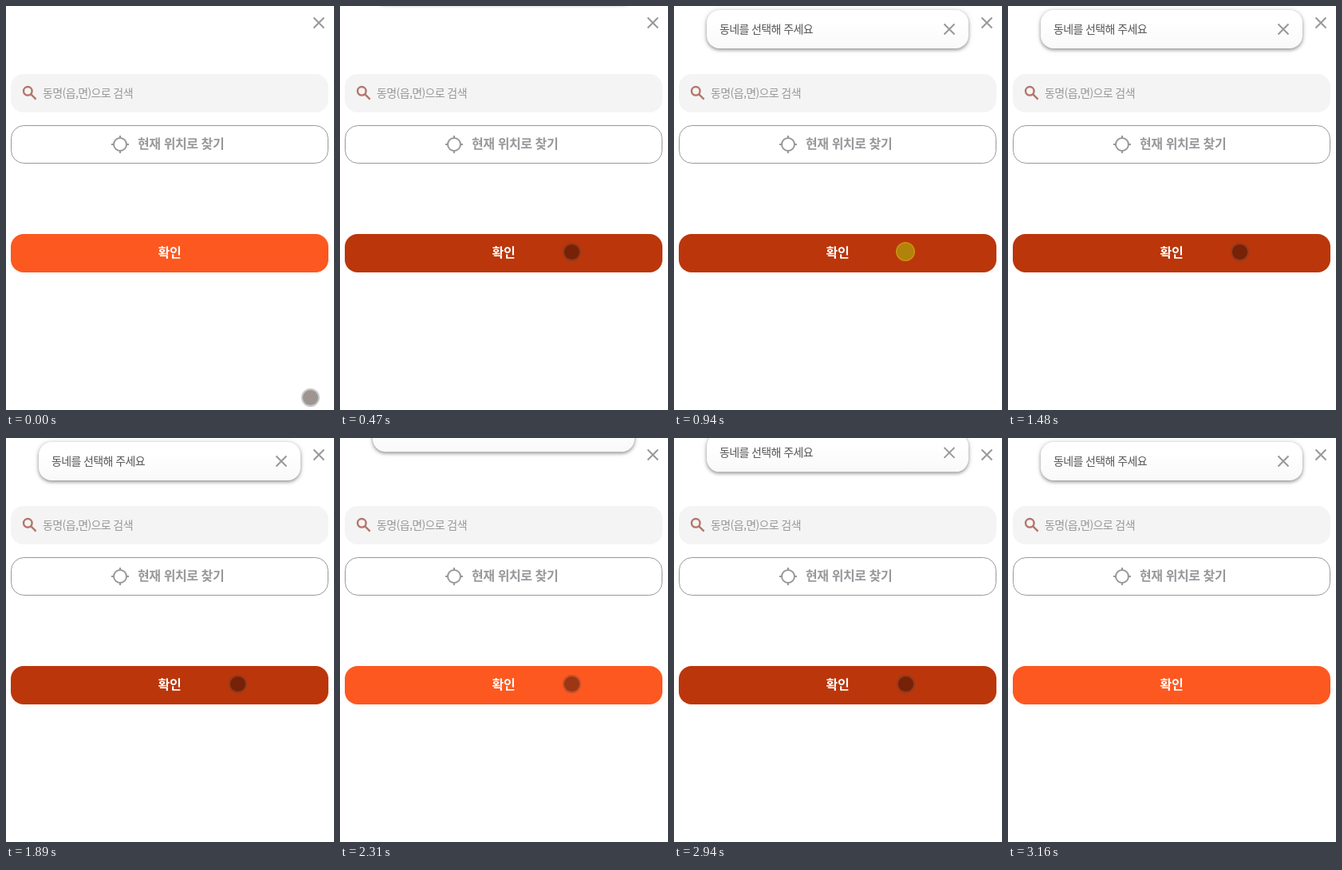
Write an HTML page that moves like this. It is 411 by 505 pixels and loops after 3820 ms.

```html
<!DOCTYPE html>
<html lang="ko">
<head>
<meta charset="utf-8">
<style>
  html, body { margin: 0; width: 100%; height: 100%; overflow: hidden; background: #fff; }
  svg { display: block; width: 100%; height: 100%; }
  text { font: 14px "Noto Sans CJK KR", "Noto Sans CJK", "Noto Sans CJK JP", sans-serif; letter-spacing: -.62px; }
  .label { font-size: 16px; font-weight: 700; letter-spacing: -.42px; }
  .line { fill: none; stroke: #98989c; stroke-width: 2; }
  #toast rect { filter: drop-shadow(0 2px 2px rgba(0,0,0,.36)) drop-shadow(0 0 3px rgba(0,0,0,.14)); }
</style>
</head>
<body>
<svg viewBox="0 0 411 505">
  <defs>
    <linearGradient id="sheen" x2="0" y2="1">
      <stop offset=".3" stop-color="#fff"/>
      <stop offset="1" stop-color="#f9f9f9"/>
    </linearGradient>
    <path id="cross" class="line" d="M-6.5-6.5 6.5 6.5M6.5-6.5-6.5 6.5"/>
  </defs>

  <use href="#cross" x="392" y="21"/>

  <rect x="6" y="85" width="398" height="48" rx="16" fill="#f4f4f4"/>
  <g fill="none" stroke="#b5766a" stroke-width="2.4">
    <circle cx="27.3" cy="106.3" r="5.3"/>
    <path d="M31.3 110.3 37.6 116.6"/>
  </g>
  <text x="46" y="114" fill="#98989c">동명(읍,면)으로 검색</text>

  <rect x="6.5" y="149.5" width="397" height="47" rx="16" fill="#fff" stroke="#98989c"/>
  <g class="line" transform="translate(143 173)">
    <circle r="8"/>
    <path d="M0-11V-7M0 11V7M-11 0H-7M11 0H7"/>
  </g>
  <text class="label" x="165" y="178" fill="#98989c">현재 위치로 찾기</text>

  <rect id="button" x="6" y="285" width="398" height="48" rx="16"/>
  <text class="label" x="190.6" y="314" fill="#fff">확인</text>

  <g id="toast">
    <rect x="41" y="5" width="328" height="48" rx="16" fill="url(#sheen)"/>
    <text x="57" y="34" fill="#555558">동네를 선택해 주세요</text>
    <use href="#cross" x="345" y="29"/>
  </g>

  <g id="pointer">
    <circle id="dot" r="10"/>
    <circle id="ring" r="10.6" fill="none" stroke-width="2"/>
  </g>
</svg>
<script>
const LOOP = 3820, HIDDEN = -58;
const [button, toast, pointer, dot, ring] =
  ["button", "toast", "pointer", "dot", "ring"].map(id => document.getElementById(id));

// [from ms, x, y]; the pointer leaves the stage at the end
const path = [[0, 381.5, 489.5], [70, 352, 426], [130, 308, 338], [200, 290.5, 307.5],
  [3000, 314, 352], [3070, 345, 411]];
const GONE = 3145;

const clamp = v => Math.min(1, Math.max(0, v));
const easeOut = p => 1 - (1 - p) ** 1.8;
const easeIn = p => p ** 1.7;

// Screen updates come in ticks, and the button is tapped on every second one
function tickAt(t) {
  const [from, step] = t < 1190 ? [395, 67.5] : [1190, 69.4];
  const n = Math.floor((t - from) / step);
  return { n, time: from + n * step };
}

function toastY(t) {
  const enter = from => HIDDEN * (1 - easeOut(clamp((t - from) / 480)));
  if (t < 455) return HIDDEN;
  if (t < 1935) return enter(455);
  if (t < 2632) return HIDDEN * easeIn(clamp((t - 1935) / 485));
  return enter(2632);
}

function isPressed(t, n) {
  if (t < 395 || t >= 2855) return false;
  if (t < 935) return n % 2 === 0;
  return t < 1190 || n % 2 === 1;
}

function draw(t) {
  const { n, time } = tickAt(t);
  const y = toastY(time);
  toast.setAttribute("transform", `translate(0 ${y.toFixed(2)})`);
  toast.style.display = y <= HIDDEN ? "none" : "";

  const dark = t >= 395 && t < 2995 && !(t >= 2300 && t < 2369);
  button.setAttribute("fill", dark ? "#bb360b" : "#fd5820");

  const down = isPressed(t, n);
  const [, px, py] = path.findLast(p => t >= p[0]);
  const shift = down ? -.5 : 0;
  pointer.style.display = t >= GONE ? "none" : "";
  pointer.setAttribute("transform", `translate(${px + shift} ${py + shift})`);
  dot.setAttribute("fill", down ? "#b0840a" : "rgba(30,10,0,.43)");
  ring.setAttribute("stroke", down ? "#c6930f" : "rgba(60,70,75,.3)");
  dot.setAttribute("r", down ? 10 : 9.6);
  ring.setAttribute("r", down ? 11 : 10.5);
}

const start = performance.now();
function frame() {
  draw((performance.now() - start) % LOOP);
  requestAnimationFrame(frame);
}
frame();
</script>
</body>
</html>
```
